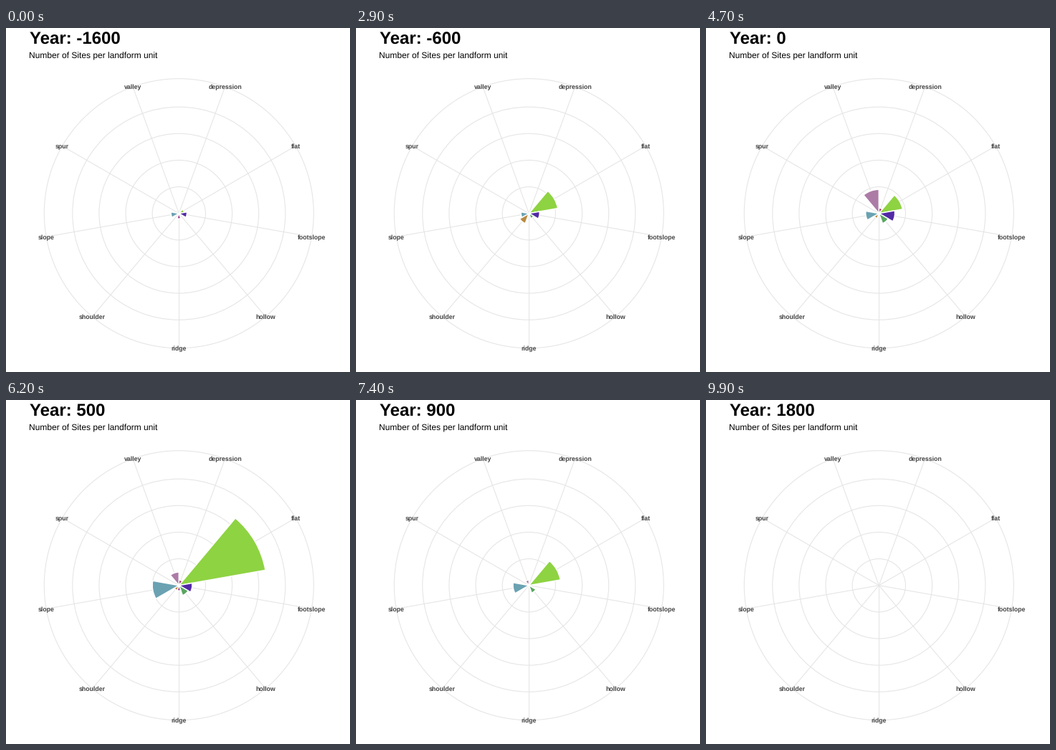
A matplotlib script that plays this animation: 480x480 px, repeating every 10 s.

```python
import math

import matplotlib.pyplot as plt
import numpy as np
from matplotlib.animation import FuncAnimation
from matplotlib.patches import Circle, Wedge

plt.rcParams["font.family"] = "Liberation Sans"
plt.rcParams["text.hinting"] = "none"

SIZE = 480
FRAMES = 100
CX, CY = 241.3, 258.7
OUTER = 188.0
UNIT = 3.713          # pixels per site
STEP = 40             # degrees per landform
GRID = dict(color="#e5e5e5", lw=1.07, zorder=1)
LAST = 34             # centuries after -1600

# Settled periods (first and last century); counts run linearly in between.
PERIODS = [(0, 3), (4, 5), (10, 12), (16, 17), (20, 21), (23, 25), (29, 32)]

LANDFORMS = {
    "depression": ("#a8325a", [0, 2, 0, 2, 2, 0, 0]),
    "flat": ("#8ed342", [2, 11, 11, 9, 33, 12, 3]),
    "footslope": ("#5229a6", [3, 0, 4, 6, 5, 0, 0]),
    "hollow": ("#5aa562", [0, 2, 2, 4, 4, 3, 0]),
    "ridge": ("#9e3a8c", [2, 2, 0, 0, 2, 0, 0]),
    "shoulder": ("#b88a40", [0, 6, 4, 2, 2, 0, 0]),
    "slope": ("#6aa2b2", [3, 5, 3, 5, 10, 6, 0]),
    "spur": ("white", [0] * 7),
    "valley": ("#ac7ba6", [0, 0, 0, 9, 5, 2, 0]),
}

# Short peaks between the settled periods.
PEAKS = {("flat", 15): 15, ("flat", 22): 45, ("flat", 26): 20,
         ("slope", 22): 16}


def sites(name, century):
    if (name, century) in PEAKS:
        return PEAKS[name, century]
    times = [t for period in PERIODS for t in period] + [LAST]
    counts = list(np.repeat(LANDFORMS[name][1], 2)) + [0]
    return round(np.interp(century, times, counts))


def century_at(frame):
    """Each century takes three frames; the last one only the final frame."""
    return LAST if frame == FRAMES - 1 else (frame + 1) // 3


def polar(bearing, radius):
    a = math.radians(bearing)
    return CX + radius * math.sin(a), CY - radius * math.cos(a)


fig = plt.figure(figsize=(SIZE / 72, SIZE / 72), dpi=72, facecolor="white")
ax = fig.add_axes([0, 0, 1, 1])
ax.set_xlim(0, SIZE)
ax.set_ylim(SIZE, 0)
ax.axis("off")

for radius in [10 * UNIT * n for n in range(1, 5)] + [OUTER]:
    ax.add_patch(Circle((CX, CY), radius, fill=False, **GRID))

wedges = {}
for i, (name, (color, _)) in enumerate(LANDFORMS.items()):
    x, y = polar(STEP * (i + 0.5), OUTER)
    ax.plot([CX, x], [CY, y], solid_capstyle="butt", **GRID)
    ax.text(x, y + 3.3, name, size=8.8, weight="bold", color="#444444",
            ha="center", va="baseline", zorder=4)
    start = STEP * i - 90
    wedges[name] = ax.add_patch(
        Wedge((CX, CY), 1, start, start + STEP, fc=color, ec="white",
              lw=1.5, zorder=2 + i / 10))

title = ax.text(32.8, 23.2, "", size=24, weight="bold", color="black",
                va="baseline")
ax.text(32.4, 42.2, "Number of Sites per landform unit", size=12,
        color="black", va="baseline")


def update(frame):
    century = century_at(frame)
    title.set_text(f"Year: {-1600 + 100 * century}")
    halfway = frame % 3 == 1
    for name, wedge in wedges.items():
        value = sites(name, century)
        if halfway:
            value = (value + sites(name, century + 1)) / 2
        wedge.set_visible(value > 0)
        wedge.set_radius(max(value, 0.01) * UNIT)
    return [title, *wedges.values()]


anim = FuncAnimation(fig, update, frames=FRAMES, interval=100,
                     init_func=lambda: update(0), repeat=True,
                     repeat_delay=0, blit=False)
plt.show()
```
